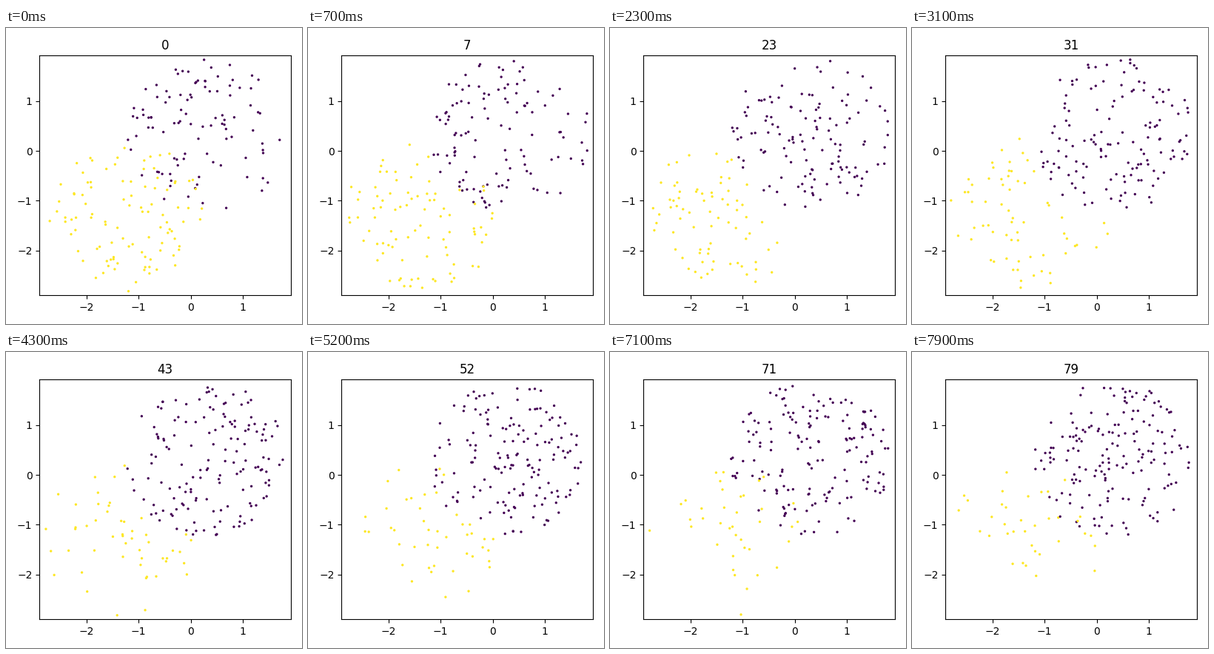
Animation of 400 by 400 pixels, one loop 8 s. Source, as a matplotlib script:

```python
import numpy as np
import matplotlib.pyplot as plt
from matplotlib.animation import FuncAnimation

FRAMES = 80
COUNT = 200
RADIUS = 1.55
SPEED = 0.1
CENTERS = np.array([[0.32, 0.32], [-1.28, -1.28]])
COLORS = np.array(["#440154", "#fde725"])


def yellow_left(step):
    """Number of particles still in the lower disc."""
    return round(30 + 70 * np.exp(-step / 32))


def reflect(pos, vel, disc):
    """Bounce particles that crossed the rim of their disc."""
    offset = pos - CENTERS[disc]
    dist = np.hypot(*offset.T)
    out = dist > RADIUS
    normal = offset[out] / dist[out, None]
    pos[out] -= 2 * (dist[out, None] - RADIUS) * normal
    vel[out] -= 2 * np.sum(vel[out] * normal, axis=1, keepdims=True) * normal


def convert(pos, disc, step, rng):
    """Hand particles in the overlap over to the upper disc."""
    inside = np.hypot(*(pos - CENTERS[0]).T) < RADIUS
    ready = np.flatnonzero((disc == 1) & inside)
    excess = max(0, np.sum(disc) - yellow_left(step))
    disc[rng.permutation(ready)[:excess]] = 0


def simulate():
    rng = np.random.default_rng(8)
    disc = np.repeat([0, 1], COUNT // 2)
    angle, heading = rng.uniform(0, 2 * np.pi, (2, COUNT))
    r = RADIUS * np.sqrt(rng.random(COUNT))
    pos = CENTERS[disc] + np.column_stack([r * np.cos(angle), r * np.sin(angle)])
    vel = SPEED * np.column_stack([np.cos(heading), np.sin(heading)])
    states = [(pos.copy(), disc.copy())]
    for step in range(1, FRAMES):
        pos += vel
        reflect(pos, vel, disc)
        convert(pos, disc, step, rng)
        states.append((pos.copy(), disc.copy()))
    return states


states = simulate()

fig, ax = plt.subplots(figsize=(4, 4), dpi=100)
ax.set(xlim=(-2.905, 1.924), ylim=(-2.9, 1.915),
       xticks=range(-2, 2), yticks=range(-2, 2))
title = ax.set_title("0")
fig.tight_layout()
dots = ax.scatter(*states[0][0].T, s=2, c=COLORS[states[0][1]])


def draw(i):
    pos, disc = states[i]
    dots.set_offsets(pos)
    dots.set_color(COLORS[disc])
    title.set_text(str(i))
    return dots, title


anim = FuncAnimation(fig, draw, frames=FRAMES, interval=100, repeat=True,
                     repeat_delay=0)
plt.show()
```
